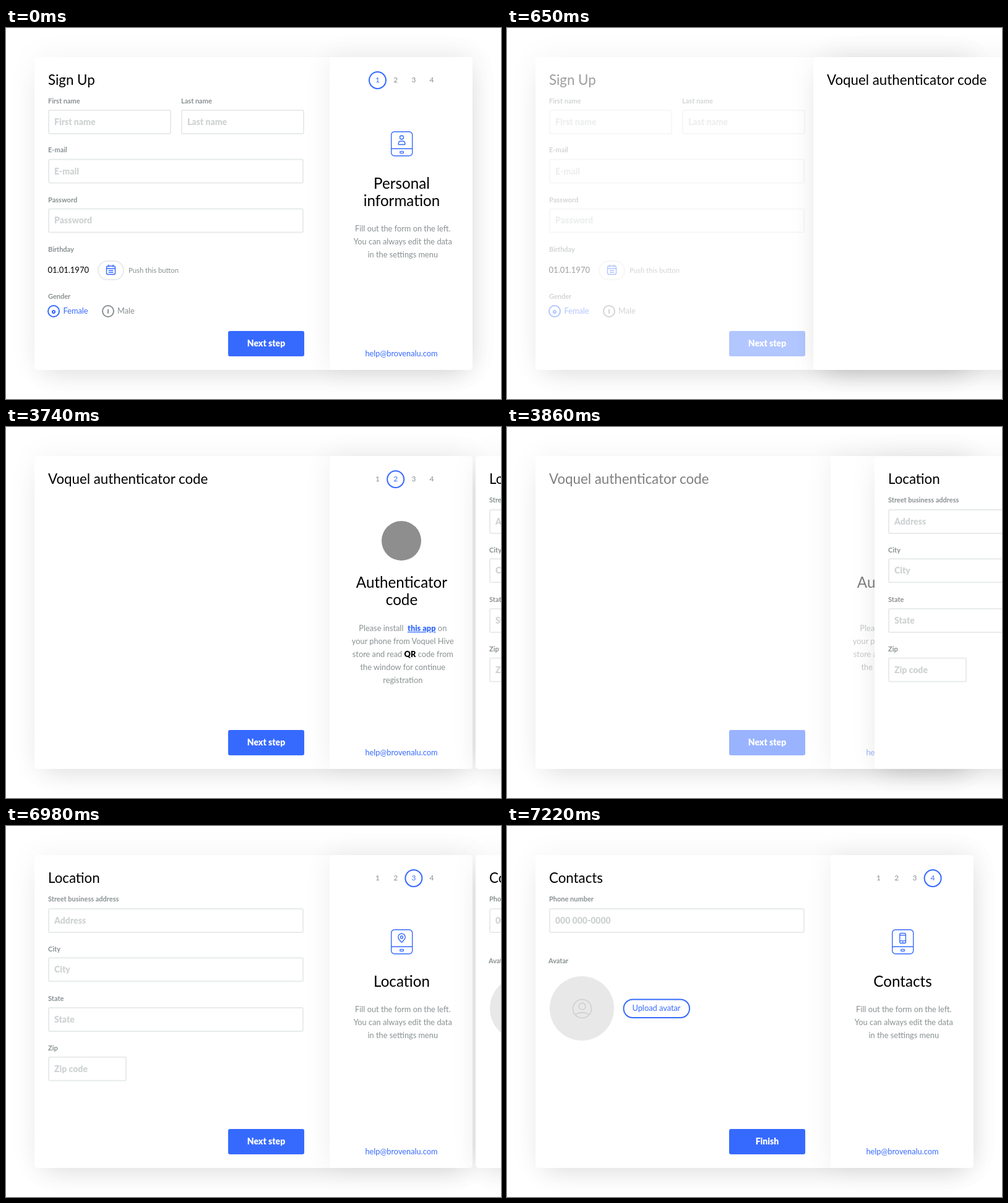
Write an HTML page that moves like this. It is 800 px wide and 600 px high and loops after 8000 ms.

```html
<!DOCTYPE html>
<html lang="en">
<head>
<meta charset="utf-8">
<title>Sign up steps</title>
<style>
  html, body { margin: 0; width: 100%; height: 100%; overflow: hidden; background: #fff; }
  #stage { position: relative; width: 800px; height: 600px; overflow: hidden; }
  .page, .page svg { position: absolute; left: 0; top: 0; width: 800px; height: 600px; }
  .card, .side { position: absolute; top: 47px; height: 506px; background: #fff; }
  .card { left: 46px; width: 708px; border-radius: 5px;
    box-shadow: 0 0 50px rgba(0,0,0,.05), 0 20px 40px -16px rgba(0,0,0,.11); }
  .side { left: 523px; width: 231px; border-radius: 0 5px 5px 0; box-shadow: 0 0 45px rgba(0,0,0,.07); }
  text { font: 12.8px Lato, "Open Sans", sans-serif; fill: #899092; white-space: pre; }
  .title { font-size: 22.3px; fill: #000; }
  .head { font-size: 24.2px; fill: #000; }
  .label { font-size: 11px; font-weight: 700; }
  .hint, .action { font-size: 14px; font-weight: 900; fill: #d0d3d4; }
  .action { fill: #fff; }
  .date { font-size: 13px; fill: #000; }
  .note { font-size: 11.3px; }
  .num { font-size: 12px; }
  .mid { text-anchor: middle; }
  .blue { fill: #366aff; }
  .strong { font-weight: 900; }
  .line { fill: none; stroke: #366aff; stroke-width: 1.4; stroke-linecap: round; stroke-linejoin: round; }
  .thick { stroke-width: 2; }
  .pale { stroke: #e8ebec; }
  .grey { stroke: #899092; }
  .soft { stroke: #cdcdcd; }
</style>
</head>
<body>
<div id="stage"></div>
<script>
const text = (x, y, cls, str) => `<text x="${x}" y="${y}" class="${cls}">${str}</text>`;
const rect = (x, y, w, h, r, cls) =>
  `<rect x="${x}" y="${y}" width="${w}" height="${h}" rx="${r}" class="${cls}"/>`;
const circle = (x, y, r, cls) => `<circle cx="${x}" cy="${y}" r="${r}" class="${cls}"/>`;
const path = (d, cls = 'line') => `<path d="${d}" class="${cls}"/>`;

// A labelled input; y is the top of its outline
const field = (x, y, w, label, hint, labelY) =>
  text(x - 1, labelY, 'label', label) +
  rect(x, y, w, 38, 2, 'line thick pale') +
  text(x + 9, y + 24, 'hint', hint);

const device = inner =>
  rect(622.7, 167.7, 34, 39, 5, 'line') + path('M623 195.3H656.5') +
  rect(636.7, 199.4, 5.8, 3, 1.5, 'line') + inner;

const FORM_HELP = ['Fill out the form on the left.', 'You can always edit the data', 'in the settings menu'];

const pages = [
  {
    title: 'Sign Up', head: ['Personal', 'information'], help: FORM_HELP, helpY: 329,
    icon: device(circle(639.5, 177, 3, 'line') +
      path('M634.3 188.5V186.8Q634.5 183 638 183H641Q644.6 183 644.8 186.8V188.5Z')),
    body:
      field(69, 133, 197, 'First name', 'First name', 122) +
      field(284, 133, 197, 'Last name', 'Last name', 122) +
      field(69, 212.6, 411, 'E-mail', 'E-mail', 201) +
      field(69, 292.4, 411, 'Password', 'Password', 282) +
      text(68, 362, 'label', 'Birthday') + text(67.5, 396, 'date', '01.01.1970') +
      rect(149, 377, 41, 30, 15, 'line thick pale') +
      rect(162.5, 385, 14, 13.5, 2.5, 'line') +
      path('M162.5 389H176.5M166 383.3V386M173 383.3V386M166.3 392.3H172.8M166.3 395.3H172.8') +
      text(198, 396, 'note', 'Push this button') +
      text(68, 438, 'label', 'Gender') +
      circle(77, 458, 9, 'line thick') + circle(77, 459, 2.1, 'line thick') +
      text(92.5, 462, 'blue', 'Female') +
      circle(165, 458, 9, 'line thick grey') + path('M165 455.8V461', 'line thick grey') +
      text(180, 462, '', 'Male')
  },
  {
    title: 'Voquel authenticator code', head: ['Authenticator', 'code'], helpY: 330,
    help: ['Please install  <tspan class="strong blue" text-decoration="underline">this app</tspan> on',
      'your phone from Voquel Hive', 'store and read <tspan class="strong" fill="#000" style="fill:#000">QR</tspan> code from',
      'the window for continue', 'registration'],
    icon: '<circle cx="639" cy="184" r="32" fill="#8e8e8e"/>',
    body: ''
  },
  {
    title: 'Location', head: ['Location'], help: FORM_HELP, helpY: 301,
    icon: device(path('M639.5 188.3C636 184.8 633.7 182.6 633.7 179.8A5.8 5.8 0 0 1 645.3 179.8C645.3 182.6 643 184.8 639.5 188.3Z') +
      circle(639.5, 179.8, 2, 'line')),
    body:
      field(69, 134, 411, 'Street business address', 'Address', 122) +
      field(69, 213.3, 411, 'City', 'City', 203) +
      field(69, 294, 411, 'State', 'State', 283) +
      field(69, 373.8, 125, 'Zip', 'Zip code', 363)
  },
  {
    title: 'Contacts', head: ['Contacts'], help: FORM_HELP, helpY: 301, action: 'Finish',
    icon: device(rect(634.8, 173.5, 9.6, 16, 2, 'line') + path('M635 176.6H644M635 185.6H644M639 187.6H640.2')),
    body:
      field(69, 134, 411, 'Phone number', '000 000-0000', 122) +
      text(67, 222, 'label', 'Avatar') +
      '<circle cx="121" cy="295" r="52" fill="#e8e8e8"/>' +
      circle(121.5, 295.5, 15, 'line soft') + circle(121.5, 291.7, 5.4, 'line soft') +
      path('M110 305Q121.5 298.5 133 305', 'line soft') +
      rect(188.5, 280.5, 106.5, 29.5, 14.75, 'line thick') +
      text(241.5, 299, 'mid blue', 'Upload avatar')
  }
];

const stepper = active => [0, 1, 2, 3].map(i => {
  const x = 600.5 + 29.2 * i, on = i === active;
  return (on ? circle(x, 84.5, 13.5, 'line thick') : '') +
    text(x, 88, 'num mid' + (on ? ' blue' : ''), i + 1);
}).join('');

const lines = (list, x, y, gap, cls) =>
  list.map((str, i) => text(x, y + i * gap, cls, str)).join('');

document.getElementById('stage').innerHTML = pages.map((p, i) => `
  <div class="page"><div class="card"></div><div class="side"></div>
  <svg viewBox="0 0 800 600">
    ${text(68, 92, 'title', p.title)}${p.body}
    ${rect(359, 490, 123, 41, 3, 'blue')}${text(420.5, 515, 'action mid', p.action || 'Next step')}
    ${stepper(i)}${p.icon}
    ${lines(p.head, 639.5, 260, 28, 'head mid')}
    ${lines(p.help, 641.3, p.helpY, 21.1, 'mid')}
    ${text(639, 531, 'mid blue', 'help@brovenalu.com')}
  </svg></div>`).join('');

const LOOP = 8000, STEP = 30, STEPS = 8, TRAVEL = 713;
const starts = [-LOOP, 500, 3740, 6980, 2 * LOOP];
const views = [...document.querySelectorAll('.page')];

const progress = (t, start) =>
  Math.max(0, Math.min(1, Math.floor((t - start) / STEP) / STEPS));

function render(t) {
  views.forEach((view, i) => {
    const enter = progress(t, starts[i]), leave = progress(t, starts[i + 1]);
    view.style.display = t >= starts[i] && leave < 1 ? '' : 'none';
    view.style.transform = `translateX(${Math.round(TRAVEL * (1 - enter ** 2.11))}px)`;
    view.lastElementChild.style.opacity = 1 - leave;
  });
}

const begin = performance.now();
function tick() {
  render((performance.now() - begin) % LOOP);
  requestAnimationFrame(tick);
}
tick();
</script>
</body>
</html>
```
